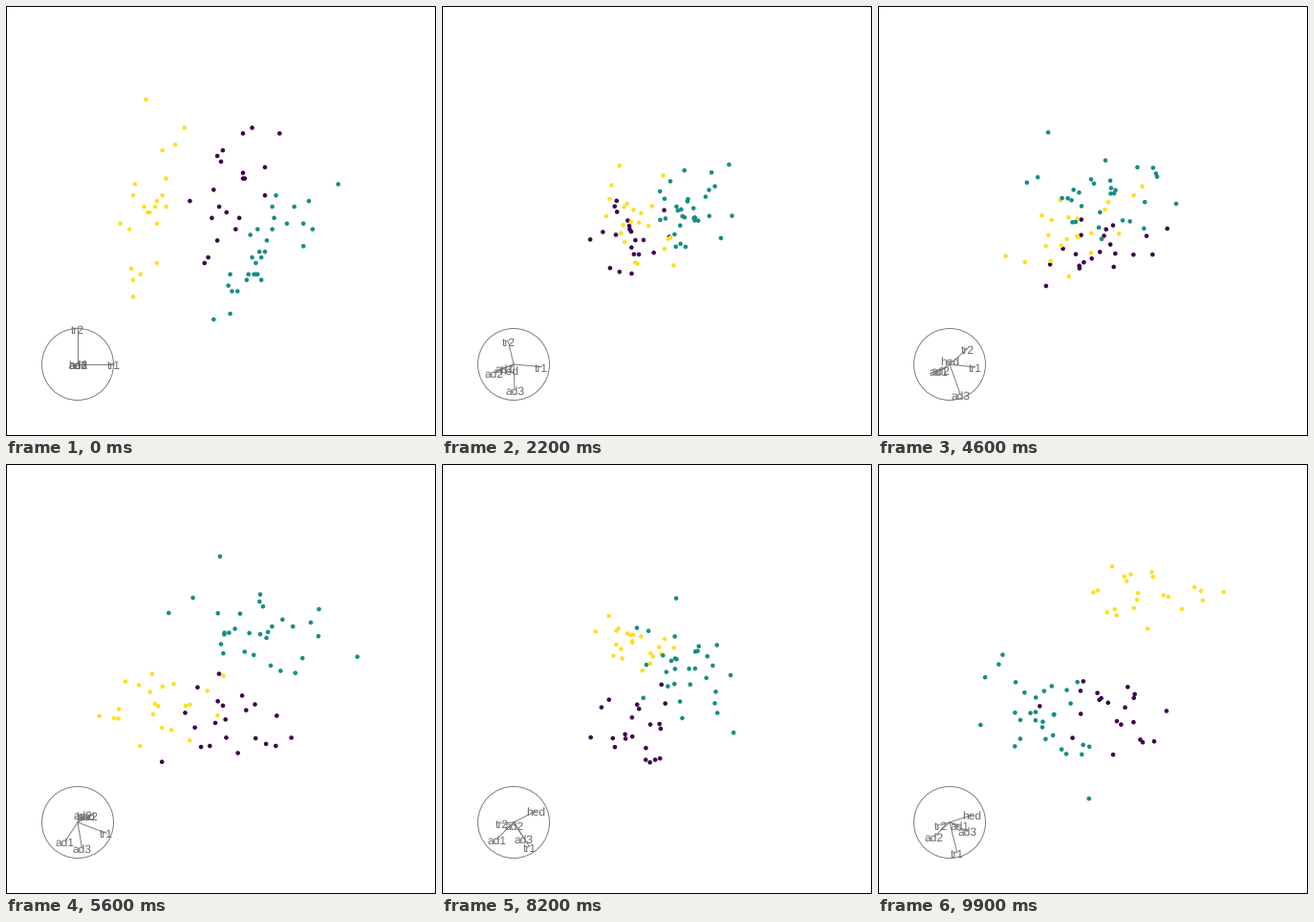
A matplotlib script for the animation above (10 s loop, 450 px wide and 450 px high).

```python
import matplotlib.pyplot as plt
import numpy as np
from matplotlib.animation import FuncAnimation
from matplotlib.patches import Circle, Rectangle

SIZE, DPI = 450, 100
PX = 72 / DPI
FRAMES, INTERVAL = 100, 100
CENTER, SCALE = 225, 230
HUB, RADIUS = 75, 37.5
HUB_Y = SIZE - HUB
GREY = "#7f7f7f"

NAMES = ("tr1", "tr2", "hed", "ad1", "ad2", "ad3")
SPAN = np.array((120, 39, 15, 41, 8, 68))
# How strongly each measurement follows overall body size.
LOADING = np.array((.8, .75, .75, .6, .25, .55))

# Colour, count, mean, spread and two outlying specimens of each group.
GROUPS = (
    ("#3f024e", 21, (183, 130, 51.2, 146, 14.1, 105), (12, 7, 2.2, 5.6, .9, 6),
     ((210, 140, 54, 149, 13, 107), (171, 118, 49, 153, 13, 106))),
    ("#fde025", 22, (138, 125, 51.6, 138, 10.1, 107), (9, 8, 2.8, 4.1, 1, 6),
     ((137, 146, 53, 137, 10, 113), (158, 141, 58, 145, 8, 107))),
    ("#168e86", 31, (201, 119, 48.9, 124.6, 14.3, 81), (15, 6.6, 2.3, 4.6, 1.1, 9),
     ((242, 131, 54, 131, 16, 90), (187, 112, 49, 119, 14, 55))),
)

# Key poses of the tour: step, horizontal axis, vertical axis.
TOUR = (
    (0, (1, 0, 0, 0, 0, 0), (0, 1, 0, 0, 0, 0)),
    (13, (.92, -.10, -.20, -.19, -.18, -.07), (-.03, .83, -.16, .05, -.36, -.38)),
    (31, (.56, -.02, -.01, -.25, -.76, .11), (-.03, .40, -.08, -.25, -.06, -.86)),
    (46, (.71, .50, .01, -.30, -.24, .30), (-.08, .44, .10, -.19, -.16, -.85)),
    (58, (.76, .33, .23, -.35, .18, .11), (-.32, .15, .20, -.50, .22, -.62)),
    (67, (.64, .12, .32, -.59, .27, .23), (-.45, .29, .57, -.34, .05, -.51)),
    (82, (.44, -.33, .62, -.48, .01, .29), (-.68, -.03, .32, -.48, -.08, -.45)),
    (99, (.20, -.24, .62, .27, -.44, .49), (-.84, -.08, .21, -.08, -.40, -.24)),
)


def specimens(rng, count, mean, spread, outliers):
    """Random specimens whose measurements share a common body size."""
    n = count - len(outliers)
    body = rng.standard_normal((n, 1))
    own = rng.standard_normal((n, len(NAMES)))
    z = LOADING * body + np.sqrt(1 - LOADING ** 2) * own
    z = (z - z.mean(axis=0)) / z.std(axis=0)
    rest = mean + .9 * np.array(spread) * z.clip(-2, 2)
    return np.vstack((outliers, rest.round()))


def orthonormal(bases):
    """Nearest bases with orthonormal columns."""
    u, _, vt = np.linalg.svd(bases, full_matrices=False)
    return u @ vt


steps = np.array([pose[0] for pose in TOUR], float)
keys = orthonormal(np.array([np.transpose(pose[1:]) for pose in TOUR], float))
slopes = np.gradient(keys, steps, axis=0)


def basis(step):
    """Projection at a step: Hermite curve through the key poses."""
    i = min(np.searchsorted(steps, step, side="right") - 1, len(steps) - 2)
    h = steps[i + 1] - steps[i]
    s = (step - steps[i]) / h
    curve = ((1 + 2 * s) * (1 - s) ** 2 * keys[i]
             + s * (1 - s) ** 2 * h * slopes[i]
             + s * s * (3 - 2 * s) * keys[i + 1]
             + s * s * (s - 1) * h * slopes[i + 1])
    return orthonormal(curve)


rng = np.random.default_rng(7)
data = np.vstack([specimens(rng, *group[1:]) for group in GROUPS])
data = (data - data.mean(axis=0)) / SPAN
colors = [group[0] for group in GROUPS for _ in range(group[1])]

plt.rcParams["font.family"] = "Liberation Sans"
plt.rcParams["text.hinting"] = "none"
fig = plt.figure(figsize=(SIZE / DPI, SIZE / DPI), dpi=DPI, facecolor="white")
ax = fig.add_axes((0, 0, 1, 1))
ax.set(xlim=(0, SIZE), ylim=(SIZE, 0))
ax.axis("off")

ax.add_patch(Rectangle((.5, .5), SIZE - 1, SIZE - 1, fill=False,
                       ec="black", lw=PX, snap=False))
ax.add_patch(Circle((HUB, HUB_Y), RADIUS, fill=False, ec=GREY, lw=PX))
spokes = [ax.plot([], [], color=GREY, lw=PX)[0] for _ in NAMES]
labels = [ax.text(HUB, HUB_Y, name, color="#6a6a6a", size=12 * PX,
                  ha="center", va="baseline", zorder=4) for name in NAMES]
dots = ax.scatter(*np.zeros((2, len(data))), c=colors,
                  s=(4.6 * PX) ** 2, linewidths=0, zorder=3)


def draw(step):
    flipped = basis(step) * (1, -1)
    dots.set_offsets(CENTER + SCALE * data @ flipped)
    tips = (HUB, HUB_Y) + RADIUS * flipped
    for spoke, label, (x, y) in zip(spokes, labels, tips):
        spoke.set_data([HUB, x], [HUB_Y, y])
        label.set_position((x, y + 5))
    return [dots, *spokes, *labels]


anim = FuncAnimation(fig, draw, frames=FRAMES, interval=INTERVAL,
                     repeat=True, repeat_delay=0)
plt.show()
```
